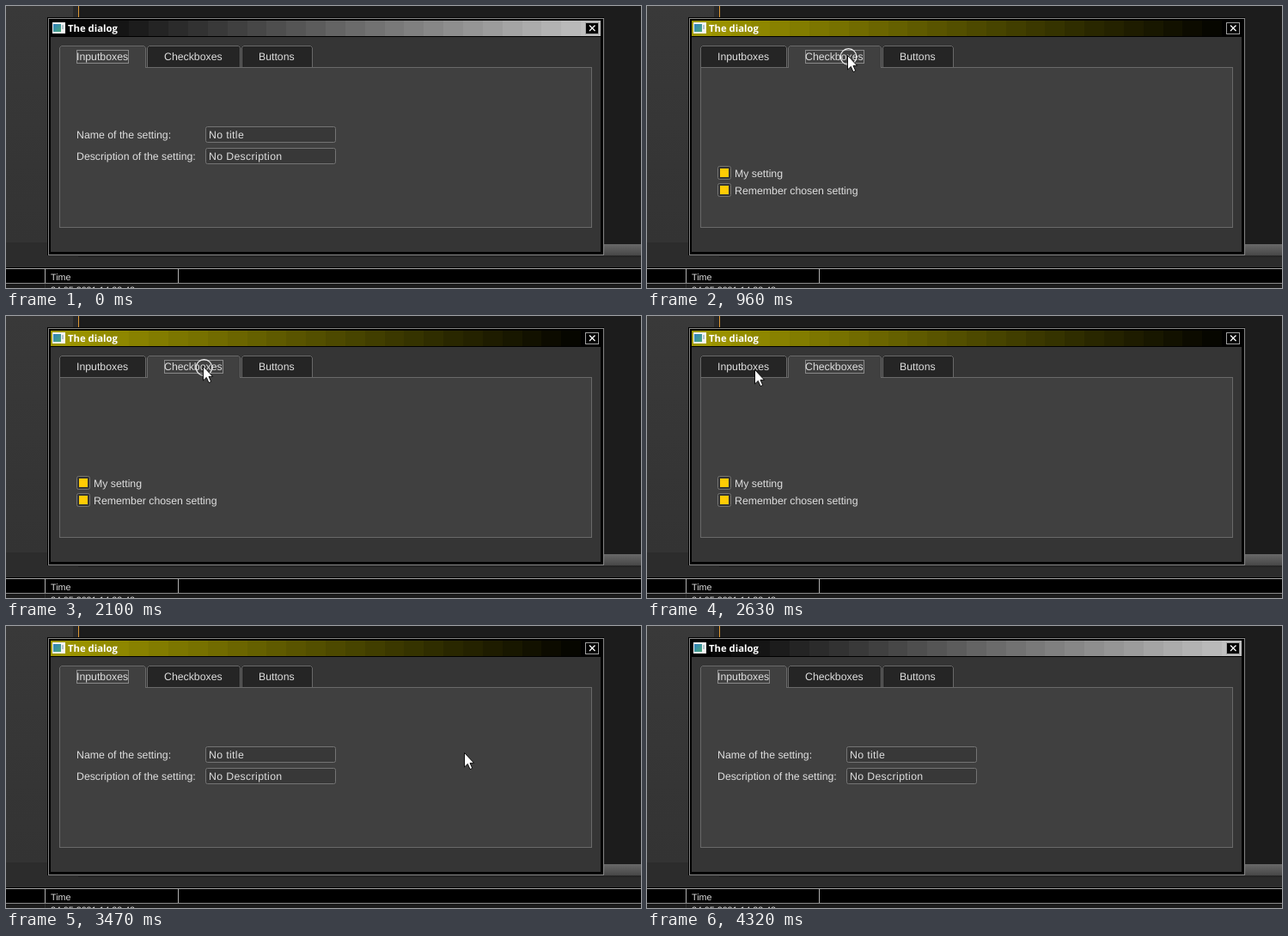
These frames come from a looping animation (739 px wide and 328 px high, 4.38 s). An HTML page:

```html
<!DOCTYPE html>
<html lang="en">
<head>
<meta charset="utf-8">
<title>The dialog</title>
<style>
  html, body { margin: 0; width: 100%; height: 100%; overflow: hidden; background: #1c1c1c; }
  svg { display: block; width: 739px; height: 328px; shape-rendering: crispEdges; }
  text { font: 12.3px "Liberation Sans", Arial, sans-serif; fill: #dedede; text-rendering: geometricPrecision; white-space: pre; }
  .caption { font: bold 11.3px "Open Sans", "Noto Sans", sans-serif; fill: #fff; }
  .small { font-size: 10.7px; }
  .value { letter-spacing: .35px; }
  .smooth { shape-rendering: geometricPrecision; }
</style>
</head>
<body>
<svg viewBox="0 0 739 328" xmlns="http://www.w3.org/2000/svg">
  <defs>
    <linearGradient id="panel" x2="0" y2="1"><stop stop-color="#393939"/><stop offset="1" stop-color="#333"/></linearGradient>
    <linearGradient id="bar" x2="0" y2="1"><stop stop-color="#686868"/><stop offset="1" stop-color="#484848"/></linearGradient>
    <linearGradient id="picture" x2="1" y2="1"><stop stop-color="#2f7fc0"/><stop offset="1" stop-color="#49a878"/></linearGradient>
  </defs>

  <!-- application behind the dialog -->
  <rect width="739" height="328" fill="#1c1c1c"/>
  <rect width="78" height="275" fill="url(#panel)"/>
  <rect x="78" width="6" height="275" fill="#292929"/>
  <rect x="84" width="1" height="14" fill="#e09a35"/>
  <rect y="275" width="739" height="29" fill="#2c2c2c"/>
  <rect x="690" y="275" width="49" height="2" fill="#1c1c1c"/>
  <rect x="690" y="277" width="49" height="13" fill="url(#bar)"/>
  <rect x="84" y="291" width="655" height="1" fill="#222"/>
  <rect y="304" width="739" height="19" fill="#000"/>
  <rect y="305" width="739" height="1" fill="#a8a8a8"/>
  <rect y="322" width="739" height="1" fill="#8c8c8c"/>
  <path d="M45.5 306V322M200.5 306V322" stroke="#b0b0b0"/>
  <path d="M45.5 323V328" stroke="#333"/>
  <text class="small" x="52" y="319">Time</text>
  <text class="small" x="52" y="334">24.05.2021 14:33:42</text>

  <!-- dialog frame -->
  <rect x="48" y="13" width="648" height="277" fill="#000"/>
  <rect x="49.5" y="14.5" width="646" height="275" fill="none" stroke="#858585"/>
  <rect x="52" y="36" width="640" height="250" fill="#353535"/>
  <g id="titleBar"></g>
  <rect x="54" y="19" width="15" height="13" fill="#f4f4f4"/>
  <rect x="55" y="21" width="9" height="9" fill="url(#picture)"/>
  <rect x="65" y="22" width="2" height="5" fill="#b5c4cc"/>
  <text class="caption" x="72" y="30">The dialog</text>
  <rect x="674.5" y="19.5" width="15" height="13" fill="#000" stroke="#a0a0a0"/>
  <path class="smooth" d="M679 22.5L685.5 29M685.5 22.5L679 29" stroke="#fff" stroke-width="1.3"/>

  <rect x="62.5" y="71.5" width="619" height="186" fill="#404040" stroke="#696969"/>
  <g id="tabs"></g>
  <g id="pages"></g>

  <g id="pointer" class="smooth">
    <circle id="ring" cx="1.5" cy="2" r="9.3" fill="none" stroke="#f0f0f0" stroke-width="1.2"/>
    <path d="M.5 .5V17L4.3 13.4L7 19.6L9.7 18.4L7 12.4H11.6Z" fill="#fff" stroke="#000" stroke-width=".9"/>
  </g>
</svg>
<script>
const LOOP = 4380, STEP = 60, BANDS = 28;
const $ = id => document.getElementById(id);
const show = (node, on) => node.setAttribute('visibility', on ? 'visible' : 'hidden');

const box = (x, y, w, h, fill, stroke = '#747474') =>
  `<rect class="smooth" x="${x + .5}" y="${y + .5}" width="${w - 1}" height="${h - 1}" rx="2" fill="${fill}" stroke="${stroke}"/>`;
const label = (x, y, text, kind = '') => `<text class="${kind}" x="${x}" y="${y}">${text}</text>`;

// Title bar: flat bands, one ramp per window state
const ramp = color => Array.from({ length: BANDS }, (_, i) => {
  const edge = n => Math.round(52 + n * 640 / BANDS);
  return `<rect x="${edge(i)}" y="17" width="${edge(i + 1) - edge(i)}" height="18" fill="rgb(${color(i / (BANDS - 1))})"/>`;
}).join('');
const yellow = t => [160 * (1 - t), 152 * (1 - t), 0].map(Math.round);
const gray = t => Array(3).fill(Math.round(192 * t));
$('titleBar').innerHTML = `<g>${ramp(gray)}</g><g>${ramp(yellow)}</g>`;
const [idleBar, activeBar] = $('titleBar').children;

// Tabs: each has an idle and a selected look
const tabs = [
  { x: 62, w: 101, text: 'Inputboxes' },
  { x: 164, w: 109, text: 'Checkboxes' },
  { x: 274, w: 83, text: 'Buttons' },
];
const tabShape = ({ x, w }, fill, bottom) =>
  `<path class="smooth" d="M${x + .5} ${bottom}V48.5l2-2h${w - 5}l2 2V${bottom}" fill="${fill}" stroke="#696969"/>`;
$('tabs').innerHTML = tabs.map(tab => `
  <g>${tabShape(tab, '#252525', 71)}</g>
  <g>${tabShape(tab, '#404040', 72)}
    <rect x="${tab.x + 20.5}" y="51.5" width="${tab.w - 41}" height="15" fill="none" stroke="#8a8a8a"/></g>
  ${label(tab.x + 20, 63, tab.text)}`).join('');
const tabLooks = [...$('tabs').querySelectorAll('g')];

const field = (y, name, value) =>
  label(82, y + 14, name) + box(232, y, 152, 19, '#383838') + label(236, y + 14, value, 'value');
const checkbox = (y, name) =>
  box(82, y, 16, 16, '#333') + `<rect x="85" y="${y + 3}" width="10" height="10" fill="#ffcc05"/>` +
  label(102, y + 13, name);
const button = (x, w, name) =>
  box(x, 236, w, 17, '#000', '#111') + box(x, 236, w - 1, 16, '#303030') + label(x + 8, 249, name);
$('pages').innerHTML = [
  field(140, 'Name of the setting:', 'No title') + field(165, 'Description of the setting:', 'No Description'),
  checkbox(186, 'My setting') + checkbox(206, 'Remember chosen setting'),
  button(82, 34, 'OK') + button(122, 55, 'Cancel'),
].map(page => `<g>${page}</g>`).join('');
const pages = [...$('pages').children];

// The pointer glides from stop to stop, sampled once per STEP
const linear = t => t;
const easeIn = t => t * t;
const easeInOut = t => t * t * (3 - 2 * t);
const entry = { x: 329, y: 330 };
const glides = [
  { start: 250, end: 730, x: 233, y: 57, ease: easeInOut },
  { start: 1020, end: 1380, x: 309, y: 50, ease: easeInOut },
  { start: 1680, end: 1980, x: 229, y: 58, ease: easeInOut },
  { start: 2100, end: 2580, x: 125, y: 62, ease: easeInOut },
  { start: 3110, end: 3470, x: 533, y: 147, ease: easeIn },
  { start: 3470, end: 3650, x: 722, y: 263, ease: linear },
  { start: 3650, end: 3950, x: 741, y: 335, ease: easeIn },
];
const clicks = [{ at: 910, tab: 1 }, { at: 1500, tab: 2 }, { at: 2040, tab: 1 }, { at: 2750, tab: 0 }];
const HOLD = 120, REACT = 50;

function pointerAt(time) {
  let { x, y } = entry;
  for (const { start, end, ease, ...stop } of glides) {
    if (time < start) break;
    const stepped = Math.floor((time - start) / STEP) * STEP;
    const k = ease(Math.min(1, stepped / (end - start)));
    x += (stop.x - x) * k;
    y += (stop.y - y) * k;
  }
  return [Math.round(x), Math.round(y)];
}

function draw(time) {
  $('pointer').setAttribute('transform', `translate(${pointerAt(time)})`);
  show($('pointer'), time >= 310 && time < 3950);
  const pressed = clicks.some(({ at }) => time >= at && time < at + HOLD);
  $('ring').setAttribute('opacity', pressed ? 1 : 0);

  const selected = clicks.findLast(({ at }) => at + REACT <= time)?.tab ?? 0;
  tabs.forEach((_, i) => {
    show(tabLooks[2 * i], i !== selected);
    show(tabLooks[2 * i + 1], i === selected);
    show(pages[i], i === selected);
  });

  const active = time >= clicks[0].at + REACT && time < LOOP - STEP;
  show(idleBar, !active);
  show(activeBar, active);
}

const started = performance.now();
function tick() {
  draw((performance.now() - started) % LOOP);
  requestAnimationFrame(tick);
}
tick();
</script>
</body>
</html>
```
